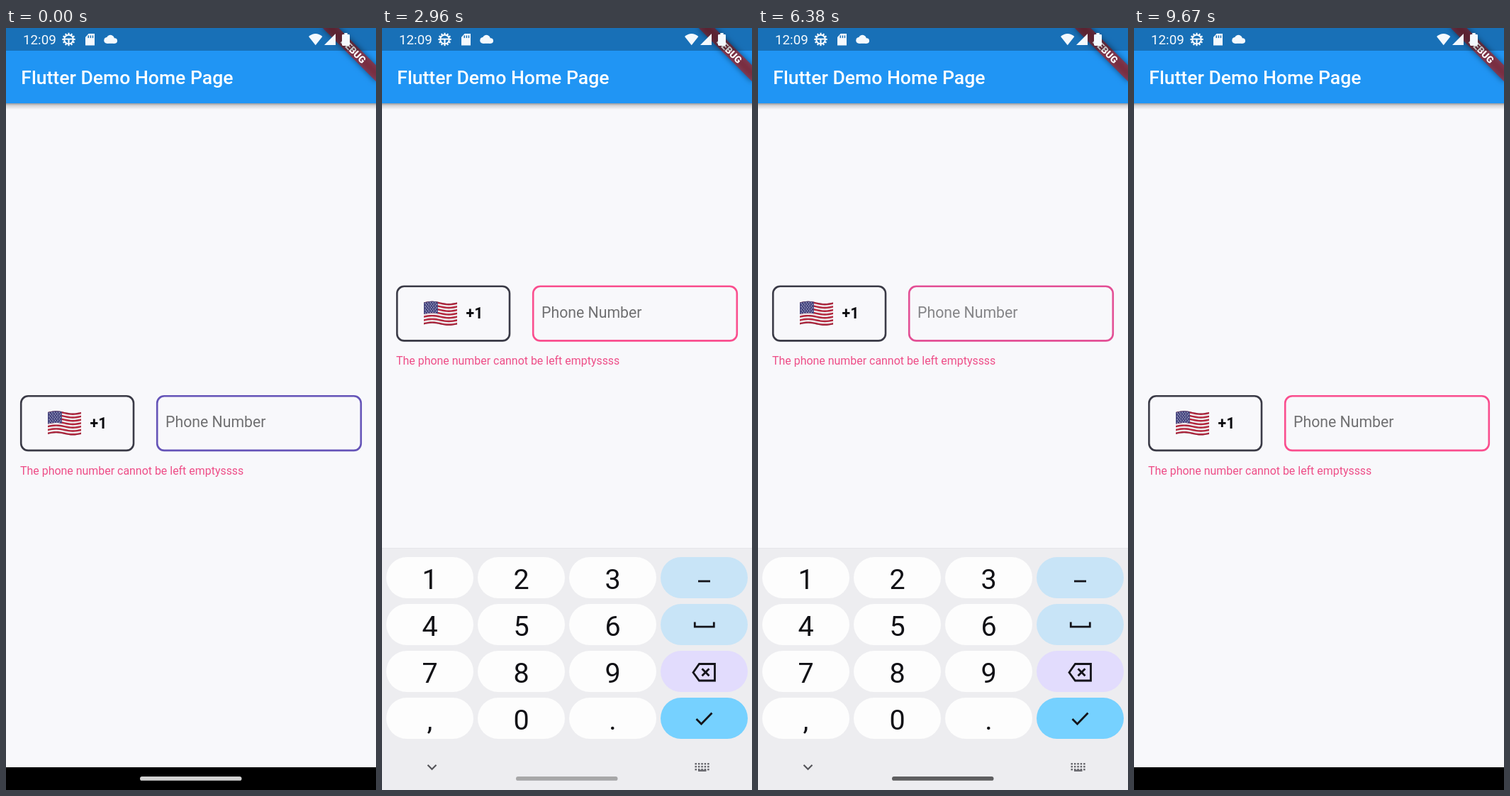
Recreate the animation shown at these times as an HTML page with a canvas. Size 522x1073 px, loop 9710 ms.

```html
<!DOCTYPE html>
<html lang="en">
<head>
<meta charset="utf-8">
<title>Phone field demo</title>
<style>
html, body { margin: 0; width: 100%; height: 100%; overflow: hidden; background: #000; }
canvas { display: block; width: 522px; height: 1073px; }
</style>
</head>
<body>
<canvas id="stage"></canvas>
<script>
const W = 522, H = 1073, LOOP = 9710;
const NAV_TOP = 1041, KB_TOP = 732, FADE = 167;
const PINK = [250, 78, 142], PURPLE = [100, 84, 184];
const FONT = 'Roboto, "Noto Sans", sans-serif';

const canvas = document.getElementById('stage');
const dpr = window.devicePixelRatio || 1;
canvas.width = W * dpr;
canvas.height = H * dpr;
const ctx = canvas.getContext('2d');

// Each entry: digit, time it appears, time it is erased
const entries = [['8', 5340, 6240], ['5', 6940, 8240]];
// Each press: key row, key column, down, up
const presses = [
  [2, 1, 5240, 5340], [2, 3, 6140, 6240],
  [1, 1, 6840, 6940], [2, 3, 8140, 8240], [3, 3, 9150, 9270]
];
const keyText = [['1', '2', '3'], ['4', '5', '6'], ['7', '8', '9'], [',', '0', '.']];
const sideFill = ['#c8e4f7', '#c8e4f7', '#e2dcfd', '#76d1ff'];

const clamp = v => Math.max(0, Math.min(1, v));
const ramp = (t, start, length) => clamp((t - start) / length);
const easeOut = k => 1 - Math.pow(1 - k, 3);
const mix = (a, b, k) => a.map((v, i) => Math.round(v + (b[i] - v) * k));
const rgb = c => `rgb(${c.join(',')})`;

function rect(x, y, w, h, fill) {
  ctx.fillStyle = fill;
  ctx.fillRect(x, y, w, h);
}

function round(x, y, w, h, r) {
  ctx.beginPath();
  ctx.roundRect(x, y, w, h, r);
}

function poly(points, close) {
  ctx.beginPath();
  points.forEach(([x, y]) => ctx.lineTo(x, y));
  if (close) ctx.closePath();
}

function stroke(color, width) {
  ctx.strokeStyle = color;
  ctx.lineWidth = width;
  ctx.stroke();
}

function text(str, x, y, size, color, weight = 400, align = 'left') {
  ctx.font = `${weight} ${size}px ${FONT}`;
  ctx.textAlign = align;
  ctx.fillStyle = color;
  ctx.fillText(str, x, y);
}

function flag(x, y) {
  const w = 47, h = 31, step = h / 13;
  const wave = u => 1.6 - 1.6 * Math.sin(u * Math.PI * 2);
  const band = (top, bottom, end, color) => {
    const points = [];
    for (let i = 0; i <= 16; i++) points.push([x + w * end * i / 16, y + top + wave(end * i / 16)]);
    for (let i = 16; i >= 0; i--) points.push([x + w * end * i / 16, y + bottom + wave(end * i / 16)]);
    poly(points, true);
    ctx.fillStyle = color;
    ctx.fill();
  };
  band(0, h, 1, '#efecee');
  for (let i = 0; i < 13; i += 2) band(i * step, (i + 1) * step, 1, '#b2253c');
  band(0, 7 * step, 0.42, '#464680');
  for (let r = 0; r < 7; r++) {
    for (let c = 0; c < 5; c++) {
      const u = (c + 0.6 + (r % 2) * 0.4) / 5.6 * 0.42;
      rect(x + w * u - 0.6, y + 1.2 + r * 2.3 + wave(u), 1.2, 1.2, '#c9c9dc');
    }
  }
  band(0, 0.7, 1, 'rgba(70,40,60,.35)');
  band(h - 0.7, h, 1, 'rgba(70,40,60,.35)');
}

function fieldState(t) {
  let purple = 1 - ramp(t, 0, FADE), hint = 1, value = '';
  for (const [digit, on, off] of entries) {
    if (t < on) continue;
    const k = ramp(t, on, FADE) - ramp(t, off, FADE);
    purple = k;
    hint = 1 - k;
    value = t < off ? digit : '';
  }
  return { purple, hint, value };
}

function form(t, inset) {
  const { purple, hint, value } = fieldState(t);
  const mid = 556.5 - inset / 2 + (value ? 17.5 : 0);
  round(21.2, mid - 38.2, 158.8, 76.6, 10);
  stroke('#3a3a46', 2.6);
  flag(59, mid - 17.2);
  text('+1', 130.5, mid + 7.3, 21.27, '#0a0a0e', 700, 'center');

  round(213.2, mid - 38.2, 287.6, 76.6, 10);
  stroke(rgb(mix(PINK, PURPLE, purple)), 2.6);
  text('Phone Number', 225, mid + 5.8, 21.27, `rgba(112,112,114,${hint})`);
  if (value) text(value, 225, mid + 5.8, 21.27, '#101014');
  else text('The phone number cannot be left emptyssss', 20, mid + 72, 15.95, '#ee4e88');
}

function appBar() {
  const shade = ctx.createLinearGradient(0, 106, 0, 115);
  shade.addColorStop(0, 'rgba(0,0,0,.38)');
  shade.addColorStop(0.35, 'rgba(0,0,0,.15)');
  shade.addColorStop(1, 'rgba(0,0,0,0)');
  rect(0, 106, W, 9, shade);
  rect(0, 0, W, 106, '#2095f4');
  text('Flutter Demo Home Page', 21.3, 79.3, 26.58, '#fff', 500);
}

function debugBanner() {
  const far = 2000;
  ctx.save();
  ctx.shadowColor = 'rgba(0,0,0,.5)';
  ctx.shadowBlur = 8 * dpr;
  ctx.shadowOffsetX = far * dpr;
  ctx.translate(W - far, 0);
  ctx.rotate(Math.PI / 4);
  rect(-53.2, 37.2, 106.4, 16, '#000');
  ctx.restore();

  ctx.save();
  ctx.translate(W, 0);
  ctx.rotate(Math.PI / 4);
  rect(-53.2, 37.2, 106.4, 16, 'rgba(183,28,28,.627)');
  text('DEBUG', 0, 50, 13.56, '#fff', 900, 'center');
  ctx.restore();
}

function statusBar() {
  const ink = '#f4f9fd';
  rect(0, 0, W, 32, 'rgba(0,0,0,.25)');
  text('12:09', 24, 23, 18.8, ink);

  // Gear
  ctx.beginPath();
  ctx.arc(88.5, 16, 6.3, 0, 7);
  stroke(ink, 2);
  for (let i = 0; i < 12; i++) {
    const a = i * Math.PI / 6, c = Math.cos(a), s = Math.sin(a);
    poly([[88.5 + 6.5 * c, 16 + 6.5 * s], [88.5 + 9.2 * c, 16 + 9.2 * s]]);
    stroke(ink, 2.2);
  }
  rect(82, 14.6, 13, 2, ink);
  rect(87.4, 16, 2.2, 6, ink);

  // Memory card
  poly([[112, 13], [116.5, 8], [125, 8], [125, 24.5], [112, 24.5]], true);
  ctx.fillStyle = ink;
  ctx.fill();
  [115.5, 118.6, 121.7].forEach(x => rect(x, 10.5, 1.5, 3.6, '#1971b7'));

  // Cloud
  ctx.fillStyle = ink;
  [[142.6, 17.4, 4.4], [147.3, 15.4, 5.6], [153.2, 18, 3.8]].forEach(([x, y, r]) => {
    ctx.beginPath();
    ctx.arc(x, y, r, 0, 7);
    ctx.fill();
  });
  rect(142.6, 17, 10.6, 4.8, ink);

  // Wi-Fi
  ctx.beginPath();
  ctx.moveTo(436.7, 24.3);
  ctx.lineTo(427, 12);
  ctx.quadraticCurveTo(436.7, 4, 446.4, 12);
  ctx.closePath();
  ctx.fill();

  // Signal and battery
  poly([[449, 24], [465, 24], [465, 8]], true);
  ctx.fill();
  round(474, 9, 11, 16, 1.4);
  ctx.fill();
  rect(477.3, 7, 4.4, 3, ink);
}

function sideIcon(row, y, color) {
  ctx.lineCap = 'butt';
  if (row === 0) poly([[446, y + 5], [463, y + 5]]);
  if (row === 1) poly([[441.3, y - 3.5], [441.3, y + 3.2], [468.3, y + 3.2], [468.3, y - 3.5]]);
  if (row === 2) {
    poly([[439, y + 1.5], [447.5, y - 10.5], [469.5, y - 10.5], [469.5, y + 13], [447.5, y + 13]], true);
    stroke(color, 2.8);
    poly([[451.5, y - 3.7], [461.5, y + 6.3]]);
    stroke(color, 2.8);
    poly([[461.5, y - 3.7], [451.5, y + 6.3]]);
  }
  if (row === 3) poly([[443.5, y + 1], [450.5, y + 8], [465.5, y - 7.5]]);
  stroke(color, 2.8);
}

function keyboard(t, top) {
  ctx.save();
  ctx.translate(0, top - KB_TOP);
  rect(0, KB_TOP, W, H - KB_TOP, '#ededf0');
  rect(0, KB_TOP, W, 1, '#e6e6ea');
  for (let row = 0; row < 4; row++) {
    const mid = 774 + row * 66;
    for (let col = 0; col < 4; col++) {
      const down = presses.some(([r, c, a, b]) => r === row && c === col && t >= a && t < b);
      const enter = row === 3 && col === 3;
      const x = 6 + col * 129;
      round(x, mid - 29, 123, 58, 29);
      ctx.fillStyle = down ? (enter ? '#006390' : '#cfcfd8') : col === 3 ? sideFill[row] : '#fdfdfd';
      ctx.fill();
      if (col === 3) sideIcon(row, mid, down && enter ? '#fff' : '#14141a');
      else text(keyText[row][col], x + 61.5, mid + 16, 39.5, '#111116', 400, 'center');
    }
  }
  poly([[64.5, 1037.8], [70.5, 1043.8], [76.5, 1037.8]]);
  stroke('#55555a', 2.2);
  for (let r = 0; r < 3; r++) {
    for (let c = 0; c < 5; c++) rect(441.5 + c * 4.4, 1035 + r * 4, 2.5, 2.4, '#66666c');
  }
  rect(446, 1044.5, 11.5, 2.4, '#66666c');
  ctx.restore();
}

function homePill(t) {
  const k = ramp(t, 2880, 180);
  const v = Math.round(255 * (1 - k));
  round(189, 1054, 143.5, 5.8, 2.9);
  ctx.fillStyle = `rgba(${v},${v},${v},${0.82 - 0.22 * k})`;
  ctx.fill();
}

function draw(t) {
  const shown = easeOut(ramp(t, 2520, 285)) * (1 - easeOut(ramp(t, 9300, 200)));
  const top = H - (H - KB_TOP) * shown;
  ctx.setTransform(dpr, 0, 0, dpr, 0, 0);
  ctx.textBaseline = 'alphabetic';
  rect(0, 0, W, H, '#f8f8fb');
  form(t, Math.max(0, NAV_TOP - top));
  appBar();
  debugBanner();
  rect(0, NAV_TOP, W, H - NAV_TOP, '#000');
  if (shown > 0) keyboard(t, top);
  statusBar();
  homePill(t);
}

const start = performance.now();
function tick() {
  draw((performance.now() - start) % LOOP);
  requestAnimationFrame(tick);
}
tick();
</script>
</body>
</html>
```
